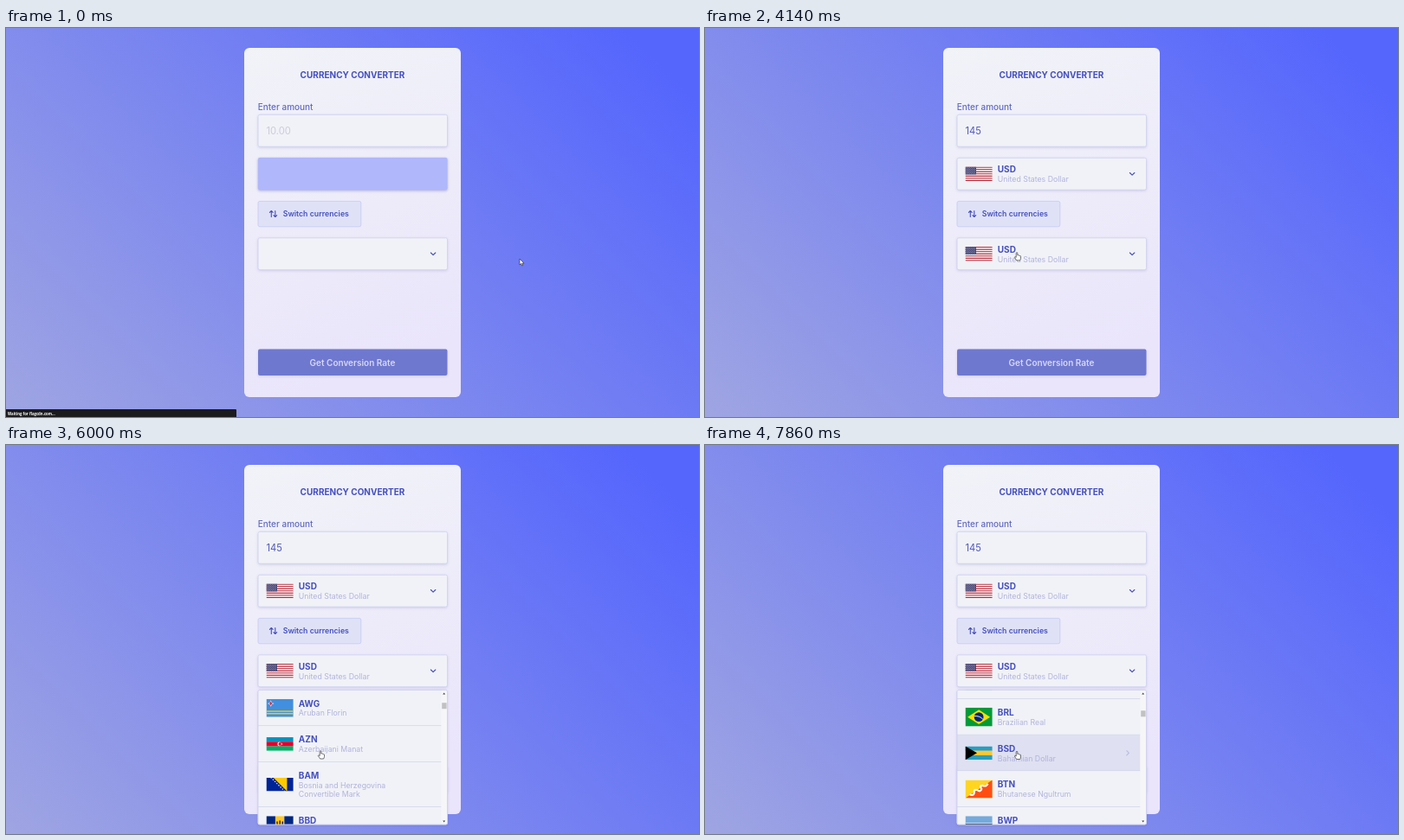
Write an HTML page that moves like this. It is 800 px wide and 450 px high and loops after 8000 ms.

```html
<!DOCTYPE html>
<html lang="en">
<head>
<meta charset="utf-8">
<title>Currency converter</title>
<style>
  html, body { margin: 0; width: 100%; height: 100%; overflow: hidden; }
  body { background: linear-gradient(45deg, #9fa5e2, #5566fd 93%); }
  #stage { display: block; width: 100vw; height: 100vh; }
  text { font-family: Inter, sans-serif; fill: #444fbf; }
  .title, .code { font-size: 10px; font-weight: 700; }
  .label { font-size: 10px; font-weight: 500; fill: #626abf; }
  .amount { font-size: 11.2px; fill: #5159b8; }
  .amount.empty { fill: #cbccd8; }
  .name { font-size: 8.75px; fill: #b1b3dc; }
  .switch { font-size: 8.75px; font-weight: 600; }
  .submit { font-size: 10px; font-weight: 600; fill: #d5d8f6; }
  .status { font: 700 4.3px "Open Sans", sans-serif; fill: #fff; }
  .box { fill: #f1f2f7; stroke: #cdd1f1; stroke-width: .8; }
  .raised { filter: drop-shadow(0 1.6px 1.6px #30308026); }
  .line { fill: none; stroke: #444cba; stroke-width: 1.1; stroke-linecap: round; stroke-linejoin: round; }
  .pointer { fill: #fff; stroke: #33343c; stroke-width: .7; stroke-linejoin: round; }
</style>
</head>
<body>
<svg id="stage" viewBox="0 0 800 450"></svg>
<script>
const FRAME_MS = 1000 / 7, FRAME_COUNT = 56;
const ROW = 125 / 3, WRAP = 125 / 12, FLAG_WIDTH = 31.25;

// Flags are drawn 30 units wide; the height follows from each flag's ratio.
const rect = (x, y, w, h, fill) => `<rect x="${x}" y="${y}" width="${w}" height="${h}" fill="${fill}"/>`;
const circle = (x, y, r, fill) => `<circle cx="${x}" cy="${y}" r="${r}" fill="${fill}"/>`;
const path = (d, fill) => `<path d="${d}" fill="${fill}"/>`;
const stroke = (d, color, width) => `<path d="${d}" fill="none" stroke="${color}" stroke-width="${width}"/>`;
const bands = (h, ...colors) => colors.map((c, i) => rect(0, i * h / colors.length, 30, h / colors.length + .05, c)).join('');
const pales = (h, ...colors) => colors.map((c, i) => rect(i * 30 / colors.length, 0, 30 / colors.length + .05, h, c)).join('');
const star = (x, y, r, fill, points = 5) => path('M' + Array.from({ length: points * 2 }, (_, i) => {
  const a = i * Math.PI / points, q = i % 2 ? r * .42 : r;
  return `${(x + q * Math.sin(a)).toFixed(2)} ${(y - q * Math.cos(a)).toFixed(2)}`;
}).join('L') + 'Z', fill);

function usFlag(h) {
  const stripes = Array.from({ length: 13 }, (_, i) => i % 2 ? '#fff' : '#b92c3c');
  let dots = '';
  for (let r = 0; r < 9; r++)
    for (let c = r % 2; c < 11; c += 2) dots += circle(1 + c, .85 + r * .85, .36, '#fff');
  return bands(h, ...stripes) + rect(0, 0, 12, h * 7 / 13, '#3c3b6e') + dots;
}
const unionJack = '<svg width="15" height="7.5">' + rect(0, 0, 15, 7.5, '#012169') +
  stroke('M0 0L15 7.5M15 0L0 7.5', '#fff', 1.5) + stroke('M0 0L15 7.5M15 0L0 7.5', '#c8102e', .5) +
  stroke('M7.5 0V7.5M0 3.75H15', '#fff', 2.5) + stroke('M7.5 0V7.5M0 3.75H15', '#c8102e', 1.5) + '</svg>';

const currencies = [
  ['USD', 'United States Dollar', 15.8, usFlag],
  ['AED', 'United Arab Emirates Dirham', 15, h => bands(h, '#00732f', '#fff', '#000') + rect(0, 0, 7.5, h, '#f00')],
  ['AFN', 'Afghan Afghani', 20, h => pales(h, '#000', '#be0000', '#007a36') +
    stroke('M12 7A4.2 4.2 0 1 0 18 7M13 13V9.5L15 7.5L17 9.5V13Z', '#fff', .9)],
  ['ALL', 'Albanian Lek', 21.4, h => rect(0, 0, 30, h, '#e30a12') +
    path('M15 6L12 4L11 6L13 8L8 7L9 13L12 12L11 16L14 15L15 18L16 15L19 16L18 12L21 13L22 7L17 8L19 6L18 4Z', '#111')],
  ['AMD', 'Armenian Dram', 15, h => bands(h, '#d90012', '#0033a0', '#f2a800')],
  ['ANG', 'Netherlands Antillean Guilder', 20, h => bands(h, '#fff', '#012a87', '#fff') + rect(12, 0, 6, h, '#dc171d') +
    rect(0, 6.7, 30, 6.6, '#012a87') + [11, 13, 15, 17, 19].map((x, i) => star(x, i % 2 ? 11 : 9, 1, '#fff')).join('')],
  ['AOA', 'Angolan Kwanza', 20, h => bands(h, '#cc092f', '#000') +
    stroke('M15 5A5 5 0 1 1 12 14M11 11L18 15', '#ffcb00', 1.2) + star(14, 9, 2, '#ffcb00')],
  ['ARS', 'Argentine Peso', 19, h => bands(h, '#74acdf', '#fff', '#74acdf') + circle(15, h / 2, 2, '#f6b40e')],
  ['AUD', 'Australian Dollar', 15, h => rect(0, 0, 30, h, '#00008b') + unionJack + star(7.5, 11.3, 2, '#fff', 7) +
    star(22, 3, 1, '#fff', 7) + star(19, 7, 1, '#fff', 7) + star(25, 6, 1, '#fff', 7) + star(22, 12, 1, '#fff', 7)],
  ['AWG', 'Aruban Florin', 20, h => rect(0, 0, 30, h, '#418fde') + rect(0, 13, 30, 1.3, '#ffd100') +
    rect(0, 15.6, 30, 1.3, '#ffd100') + star(5, 5, 3.6, '#fff', 4) + star(5, 5, 2.7, '#d22630', 4)],
  ['AZN', 'Azerbaijani Manat', 15, h => bands(h, '#0092bc', '#e4002b', '#00af66') +
    circle(14.5, 7.5, 2.2, '#fff') + circle(15.2, 7.5, 1.8, '#e4002b') + star(17, 7.5, 1.3, '#fff', 8)],
  ['BAM', 'Bosnia and Herzegovina|Convertible Mark', 15, h => rect(0, 0, 30, h, '#002395') + path('M8 0H23V15Z', '#fecb00') +
    Array.from({ length: 8 }, (_, i) => star(5.5 + i * 2.1, i * 2.1, 1.1, '#fff')).join('')],
  ['BBD', 'Barbadian Dollar', 20, h => pales(h, '#00267f', '#ffc726', '#00267f') +
    stroke('M15 5V15M12 6Q12 11 13 11H17Q18 11 18 6', '#000', 1.2)],
  ['BDT', 'Bangladeshi Taka', 18, h => rect(0, 0, 30, h, '#006a4e') + circle(13.5, 9, 6, '#f42a41')],
  ['BGN', 'Bulgarian Lev', 18, h => bands(h, '#fff', '#00966e', '#d62612')],
  ['BHD', 'Bahraini Dinar', 18, h => rect(0, 0, 30, h, '#fff') +
    path('M30 0H8L14 1.8L8 3.6L14 5.4L8 7.2L14 9L8 10.8L14 12.6L8 14.4L14 16.2L8 18H30Z', '#da291c')],
  ['BIF', 'Burundian Franc', 18, h => rect(0, 0, 30, h, '#d8141d') + path('M0 0L15 9L0 18ZM30 0L15 9L30 18Z', '#1eb53a') +
    stroke('M0 0L30 18M30 0L0 18', '#fff', 3) + circle(15, 9, 5.2, '#fff') +
    star(15, 6.4, 1.4, '#ce1126', 6) + star(12.8, 10.5, 1.4, '#ce1126', 6) + star(17.2, 10.5, 1.4, '#ce1126', 6)],
  ['BMD', 'Bermudian Dollar', 15, h => rect(0, 0, 30, h, '#c8102e') + unionJack +
    path('M19.5 4H26V9Q25 11 22.7 11.5Q20.500 11 19.5 9Z', '#fff') + rect(20, 9, 5.5, 1, '#3c8d40') + circle(22.7, 7, 1.6, '#c8102e')],
  ['BND', 'Brunei Dollar', 15, h => rect(0, 0, 30, h, '#f7e017') + path('M0 1L30 9V12L0 5Z', '#fff') +
    path('M0 4L30 11V14.500L0 7Z', '#000') + stroke('M12 6Q12.500 11 15 11Q17.500 11 18 6M15 4V12', '#cf1126', 1.1)],
  ['BOB', 'Bolivian Boliviano', 20.4, h => bands(h, '#d52b1e', '#f9e300', '#007934')],
  ['BRL', 'Brazilian Real', 21, h => rect(0, 0, 30, h, '#009b3a') + path('M15 2.5L27.500 10.5L15 18.500L2.5 10.5Z', '#fedf00') +
    circle(15, 10.5, 5.2, '#002776') + stroke('M10 9.500Q16 9 19.500 13', '#fff', .9)],
  ['BSD', 'Bahamian Dollar', 15, h => bands(h, '#279dc0', '#ffc72c', '#279dc0') + path('M0 0L13 7.5L0 15Z', '#000')],
  ['BTN', 'Bhutanese Ngultrum', 20, h => rect(0, 0, 30, h, '#ffd520') + path('M30 0V20H0Z', '#ff4e12') +
    stroke('M5 16Q9 18 10 14Q9 10 13 11Q17 14 18 10Q15 6 19 6Q23 8 25 4', '#fff', 2)],
  ['BWP', 'Botswana Pula', 20, h => rect(0, 0, 30, h, '#75aadb') + rect(0, 7.5, 30, 5, '#fff') + rect(0, 8.300, 30, 3.4, '#000')],
  ['BYN', 'Belarusian Ruble', 15, h => bands(h, '#c8313e', '#c8313e', '#4aa657')]
];

const text = (cls, x, y, s, extra = '') => `<text class="${cls}" x="${x}" y="${y}" ${extra}>${s}</text>`;
const box = (y, h, cls = 'box raised') => `<rect class="${cls}" x="291" y="${y}" width="218.500" height="${h}" rx="2"/>`;

function currency([code, name, height, draw], left, middle) {
  const lines = name.split('|'), shift = (lines.length - 1) * WRAP / 2;
  const drawn = FLAG_WIDTH * height / 30;
  return `<svg x="${left}" y="${middle - drawn / 2}" width="${FLAG_WIDTH}" height="${drawn}" viewBox="0 0 30 ${height}">${draw(height)}</svg>` +
    text('code', left + 37.3, middle - 1.5 - shift, code) +
    lines.map((s, i) => text('name', left + 37.3, middle + 9.2 - shift + i * WRAP, s)).join('');
}

let top_ = 0;
const rows = currencies.map((item, i) => {
  const top = top_, height = ROW + (item[1].includes('|') ? WRAP : 0), mid = top + height / 2;
  top_ += height;
  return `<g><rect class="rowbg" y="${top}" width="211.500" height="${height}" fill="#f1f2f7"/>` +
    rect(0, top + height - .7, 211.5, .9, '#cfd2e9') + currency(item, 9.500, mid) +
    `<path class="line arrow" d="M195.800 ${mid - 2.6}l2.6 2.6l-2.6 2.6"/></g>`;
}).join('');

const stage = document.getElementById('stage');
stage.innerHTML = `
  <linearGradient id="paper" x1="0" y1="0" x2=".25" y2="1">
    <stop stop-color="#f1f3f8"/><stop offset="1" stop-color="#eae5fb"/>
  </linearGradient>
  <rect x="275" y="23" width="250" height="404" rx="6" fill="url(#paper)"/>
  ${text('title', 400, 57.6, 'CURRENCY CONVERTER', 'text-anchor="middle"')}
  ${text('label', 290.7, 94.5, 'Enter amount')}
  ${box(100.3, 36.9)}
  ${text('amount', 300.4, 122.6, '', 'id="amount"')}
  <rect id="caret" y="113" width=".6" height="11.500" fill="#8b90c4"/>
  ${box(150.3, 36.9)}
  ${box(242.8, 36.9)}
  <path class="line" d="M490.400 167.500l2.7 2.700l2.7 -2.700M490.400 260l2.7 2.700l2.7 -2.700"/>
  <g id="chosen">${currency(currencies[0], 300.5, 168.8)}${currency(currencies[0], 300.5, 261.3)}</g>
  <g id="loading">${box(150, 37.500, 'raised" fill="#b0b7fb')}</g>
  <rect x="291" y="200.400" width="118.800" height="29.400" rx="2" fill="#dfe2f7" stroke="#c4caf4" stroke-width=".8"/>
  <path class="line" d="M306.300 218.500v-7m-1.900 1.900l1.900 -1.900l1.900 1.900M310.800 211.500v7m-1.900 -1.900l1.900 1.900l1.900 -1.900"/>
  ${text('switch', 319.7, 218.4, 'Switch currencies')}
  ${box(371.5, 30.500, 'raised" fill="#6f78cf')}
  ${text('submit', 400, 390.500, 'Get Conversion Rate', 'text-anchor="middle"')}
  <g id="menu">
    ${box(283.4, 155.600)}
    <svg x="291" y="283.400" width="218.500" height="155.600">
      <g id="list">${rows}</g>
      ${rect(211.5, 0, 7, 155.6, '#f6f6f8')}
      <rect id="thumb" x="212.200" width="5.4" height="7" fill="#c1c1c3"/>
      <path id="up" d="M213.200 5l1.500 -2l1.500 2z"/>
      <path d="M213.200 151l1.500 2l1.500 -2z" fill="#444"/>
    </svg>
    ${box(283.4, 155.600, 'box" style="fill:none')}
  </g>
  <g id="status">
    <path d="M0 441H265Q266 441 266 442V450H0Z" fill="#1b1b1d"/>
    ${text('status', 2, 447.500, 'Waiting for flagcdn.com...')}
  </g>
  <g id="cursor">
    <path class="pointer" d="M0 0V7L1.600 5.600L2.700 8L3.800 7.500L2.800 5.200H5Z"/>
    <path d="M-1.300 -3.900Q0 -3.900 0 -3.200Q0 -3.900 1.300 -3.900M0 -3.400V3.400M-1.300 3.900Q0 3.900 0 3.200Q0 3.900 1.300 3.900" fill="none" stroke="#4a4b55" stroke-width=".7"/>
    <path class="pointer" d="M-.8 .8Q0 -.5 .8 .8V3.600Q1.500 3 2.200 3.800Q3 3.300 3.500 4.200Q4.500 4 4.500 5V7Q4.300 8.500 3.600 9.500H-.3Q-1.500 7.800 -2.700 6Q-2.600 4.600 -.8 6Z"/>
  </g>`;

const $ = id => document.getElementById(id);
const show = (el, on) => el.setAttribute('visibility', on ? 'visible' : 'hidden');
const listRows = [...$('list').children], cursors = [...$('cursor').children];

// Linear interpolation over [frame, ...values] keys.
function track(keys, f) {
  const next = keys.findIndex(k => k[0] > f);
  if (next < 0) return keys.at(-1).slice(1);
  const a = keys[next - 1], b = keys[next], p = (f - a[0]) / (b[0] - a[0]);
  return a.slice(1).map((v, i) => v + (b[i + 1] - v) * p);
}
const cursorKeys = [[0, 593, 267], [6, 586, 235], [7, 500, 198], [8, 400, 158], [9, 365, 134], [10, 360, 131],
  [23, 360, 131], [28, 360, 258], [31, 360, 262], [33, 360, 323], [42, 363, 353.5], [49, 363, 357.5], [55, 360, 354]];
const scrollKeys = [[0, 0], [33, 0], [42, 9], [43, 9], [49, 15.87], [50, 16], [54, 20]];

function cursorKind(x, y, open) {
  if (x < 291 || x > 509) return 0;
  if (y > 100 && y < 137) return 1;
  const clickable = (y > 150 && y < 187) || (y > 200 && y < 230 && x < 410) || (y > 243 && y < 280) || (open && y > 283);
  return clickable ? 2 : 0;
}

function draw(f) {
  show($('status'), f < 4);
  show($('loading'), f < 2);
  show($('chosen'), f >= 3);

  const typed = '145'.slice(0, (f >= 18) + (f >= 20) + (f >= 22));
  const amount = $('amount');
  amount.textContent = typed || '10.00';
  amount.classList.toggle('empty', !typed);
  $('caret').setAttribute('x', 300.6 + (typed ? amount.getComputedTextLength() : 0));
  show($('caret'), f >= 11 && f < 24 && Math.floor(f / 3.5) % 2);

  const open = f >= 31, opening = f === 31;
  $('menu').setAttribute('display', open ? 'inline' : 'none');
  $('menu').setAttribute('opacity', opening ? .6 : 1);
  $('menu').setAttribute('transform', `translate(0 ${opening ? -15 : 0})`);

  const scroll = track(scrollKeys, f)[0] * ROW;
  $('list').setAttribute('transform', `translate(0 ${-scroll})`);
  $('thumb').setAttribute('y', 7.4 + scroll * .0198);
  $('up').setAttribute('fill', scroll ? '#444' : '#aaa');
  const hovered = scroll === 0 ? 0 : f >= 55 ? 21 : -1;
  listRows.forEach((row, i) => {
    row.querySelector('.rowbg').setAttribute('fill', i === hovered ? '#dfe0f1' : '#f1f2f7');
    row.querySelector('.arrow').setAttribute('opacity', i !== hovered ? 0 : i ? .25 : 1);
  });

  const [x, y] = track(cursorKeys, f), kind = cursorKind(x, y, open);
  $('cursor').setAttribute('transform', `translate(${x} ${y})`);
  cursors.forEach((el, i) => show(el, i === kind));
}

const start = performance.now();
let last = -1;
function tick() {
  const f = Math.floor((performance.now() - start + 5) / FRAME_MS) % FRAME_COUNT;
  if (f !== last) draw(last = f);
  requestAnimationFrame(tick);
}
tick();
</script>
</body>
</html>
```
